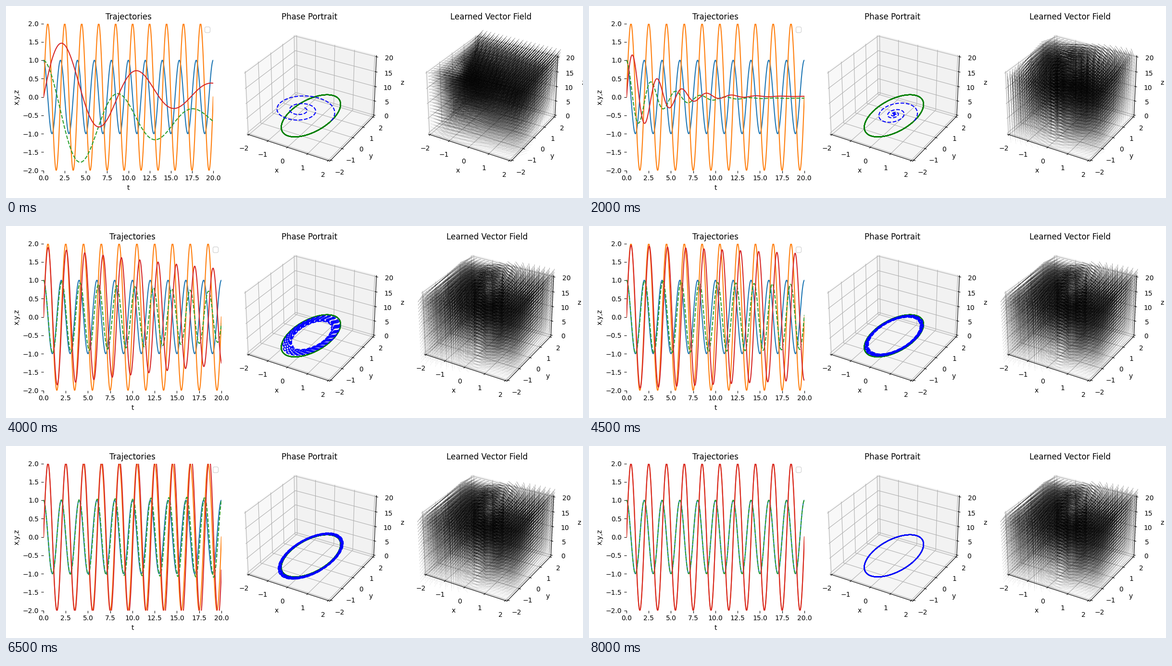
These frames come from a looping animation (1200x400 px, 8500 ms). A matplotlib script:

```python
import numpy as np
import matplotlib.pyplot as plt
from matplotlib.animation import FuncAnimation

W, H, DPI = 1200, 400, 100
FRAMES, INTERVAL = 17, 500
BOTTOM, SIZE, MIDDLE = 57.5, 306, 631.5
GRID_N, Z_MAX, ARROW = 20, 20, .82

t = np.linspace(0, 20, 1000)
true_x, true_y = np.cos(np.pi * t), 2 * np.sin(np.pi * t)


class Model:
    """Linear spiral whose parameters approach the true orbit."""

    def __init__(self, step):
        early = min(step / 8, 1)
        late = max(step / 8 - 1, 0)
        self.cx = -.66 * np.exp(-.74 * step)
        self.cy = .1 * np.exp(-.45 * step)
        self.omega = (np.pi - 2.17 * (1 - early ** .58)
                      - .092 * (2 - step / 8) ** 1.5)
        self.damping = (.071 * (1 - early)
                        + .255 * np.sin(np.pi * early ** .85)
                        + .019 * (1 - late) ** 2 * (1 - 4.5 * late))
        self.ratio = 2 - np.exp(-(step / 5.7) ** 2.5)
        self.drift = np.exp(-1.5 * step)

    def path(self):
        x0, y0 = 1 - self.cx, -self.cy
        decay = np.exp(-self.damping * t)
        c, s = np.cos(self.omega * t), np.sin(self.omega * t)
        return (self.cx + decay * (x0 * c - y0 / self.ratio * s),
                self.cy + decay * (self.ratio * x0 * s + y0 * c))

    def direction(self, x, y, level):
        x, y = x - self.cx, y - self.cy
        dx = -self.damping * x - self.omega / self.ratio * y
        dy = self.omega * self.ratio * x - self.damping * y
        dx = dx + .9 * self.drift * level
        dy = dy + 3 * self.drift * level
        norm = np.hypot(dx, dy)
        return dx / norm, dy / norm


axis = np.linspace(-2, 2, GRID_N)
gx, gy = (g.ravel() for g in np.meshgrid(axis, axis))
gap = np.full_like(gx, np.nan)


def strokes(start, end):
    return np.stack([start, end, gap], 1).ravel()


def box(left, width):
    return [left / W, BOTTOM / H, width / W, SIZE / H]


def add_space(title):
    ax = fig.add_axes(box(MIDDLE - SIZE / 2, SIZE), projection="3d")
    ax.set(title=title, xlabel="x", ylabel="y", zlabel="z")
    edge, pad = 2 * 25 / 24, Z_MAX / 48
    ax.set_xlim(-edge, edge)
    ax.set_ylim(-edge, edge)
    ax.set_zlim(-pad, Z_MAX + pad)
    ax.set_xticks(range(-2, 3))
    ax.set_yticks(range(-2, 3))
    ax.set_zticks(range(0, 21, 5))
    return ax


fig = plt.figure(figsize=(W / DPI, H / DPI), dpi=DPI, facecolor="white")

traj = fig.add_axes(box(78, 353))
traj.set(title="Trajectories", xlabel="t", ylabel="x,y,z",
         xlim=(0, 20), ylim=(-2, 2))
traj.set_xticks(np.arange(0, 20.1, 2.5))
traj.set_yticks(np.arange(-2, 2.1, .5))
traj.spines[:].set_visible(False)
traj.plot(t, true_x, "C0", t, true_y, "C1")
line_x, = traj.plot([], [], "C2--")
line_y, = traj.plot([], [], "C3-")
traj.legend([], [], loc="upper right")

phase = add_space("Phase Portrait")
height = np.full_like(t, np.pi)
phase.plot(true_x, true_y, height, "g-")
orbit, = phase.plot([], [], [], "b--")

# arrows are drawn one height level at a time, fainter near the floor
field = add_space("Learned Vector Field")
levels = np.linspace(0, 1, GRID_N)
layers = [field.plot([], [], [], "k", lw=.3, alpha=.15 + .75 * level,
                     solid_capstyle="butt")[0] for level in levels]


def update(step):
    # the layout settles over the first few steps
    width = 370 - 17 / 3 ** step
    pitch = MIDDLE - 78 - width / 2
    traj.set_position(box(78, width))
    field.set_position(box(MIDDLE + pitch - SIZE / 2, SIZE))

    model = Model(step)
    x, y = model.path()
    line_x.set_data(t, x)
    line_y.set_data(t, y)
    orbit.set_data_3d(x, y, height)
    for layer, level in zip(layers, levels):
        dx, dy = model.direction(gx, gy, level)
        z = np.full_like(gx, level * Z_MAX)
        layer.set_data_3d(strokes(gx, gx + ARROW * dx),
                          strokes(gy, gy + ARROW * dy), strokes(z, z))
    return [line_x, line_y, orbit, *layers]


anim = FuncAnimation(fig, update, frames=FRAMES, interval=INTERVAL,
                     init_func=lambda: update(0), repeat=True)
plt.show()
```
